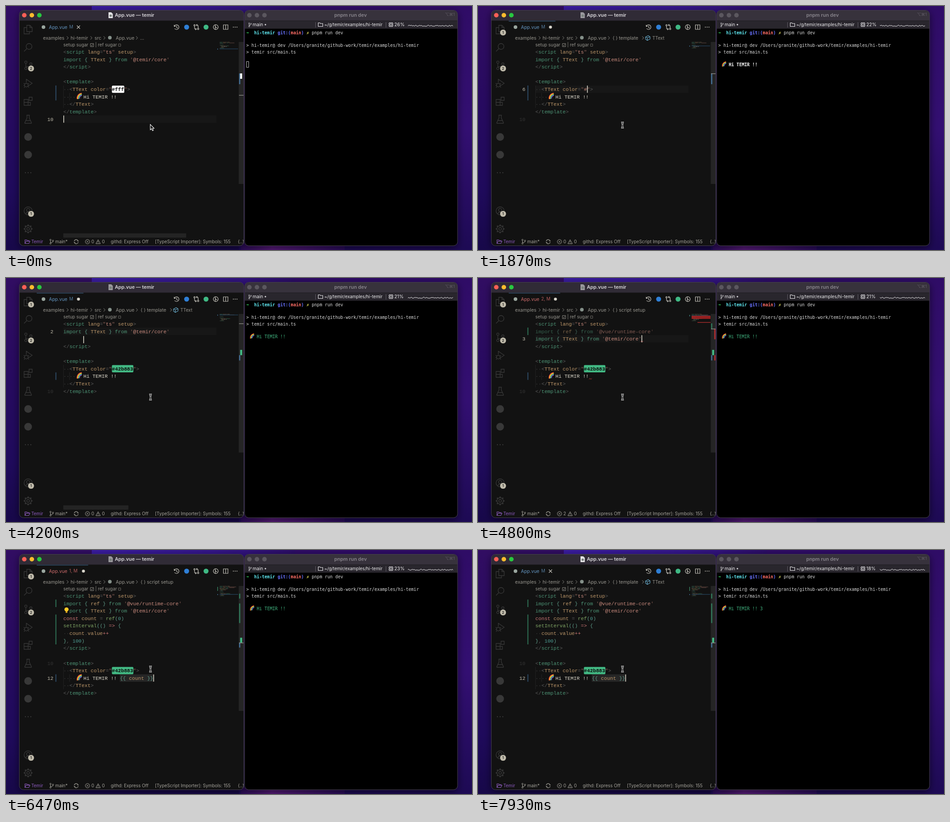
An HTML page with a canvas for the animation above (8 s loop, 1032 px wide and 543 px high).

```html
<!DOCTYPE html>
<html lang="en">
<head>
<meta charset="utf-8">
<title>hi-temir</title>
<style>
html, body { margin: 0; width: 100%; height: 100%; overflow: hidden; background: #1c0a50; }
canvas { display: block; }
</style>
</head>
<body>
<canvas id="stage" width="1032" height="543"></canvas>
<script>
const ctx = document.getElementById('stage').getContext('2d');
const LOOP = 8000, CW = 6.721, TW = 5.8, LEFT = 127, PITCH = 16.63;
const UI = 'Inter, "Open Sans", sans-serif';
const CODE = '"Liberation Mono", monospace';
const TERM = '"DejaVu Sans Mono", monospace';
const INK = {
  d: '#5c5c5c', g: '#4d9375', t: '#bd976a', s: '#c98a7d', q: '#8a6158', b: '#5d9a87',
  w: '#dbd7ca', r: '#cb7676', f: '#80a665', n: '#4c9a91'
};

// Each token: colour key, then its text. "c" is a colour swatch, "e" a rainbow.
const IMPORT_REF = "gimport |b{ |tref |b} |gfrom |q'|s@vue/runtime-core|q'";
const IMPORT_TEXT = "gimport |b{ |tTText |b} |gfrom |q'|s@temir/core|q'";
const TIMER = ['rconst |tcount |d= |fref|b(|n0|b)', 'fsetInterval|b(() |r=> |b{',
  'd  |tcount|d.|tvalue|r++', 'b}|d, |n100|b)'];

const ACT = {
  output: 300, point: 560, toColor: 1000, erase: 1500, type: 1980, save1: 2870, green: 3000,
  toImport: 3700, enter: 4150, auto: 4600, errors: 4800, paste: 5400, lint: 5850,
  toText: 6060, mustache: 6370, settle: 6650, save2: 7070, count: 7600
};
const CARET = [
  [-200, 127, 10], [ACT.toColor, 261.4, 6], [1500, 254.7, 6], [1650, 248, 6], [1800, 241.2, 6],
  [1980, 248, 6], [2090, 254.7, 6], [2200, 261.4, 6], [2310, 268.2, 6], [2420, 274.9, 6], [2530, 281.6, 6],
  [ACT.toImport, 362, 2], [ACT.enter, 127, 3], [ACT.auto, 362, 3], [ACT.paste, 127, 4], [5500, 174, 7],
  [ACT.toText, 245.5, 12], [6250, 252, 12], [ACT.mustache, 326.2, 12], [7500, 326.2, 12]
];

const lineY = n => 102 + PITCH * (n - 1);
const during = (t, a, b) => t >= a && t < b;
const rand = n => { const v = Math.sin(n * 91.7 + 4.1) * 43758.5; return v - Math.floor(v); };

function rect(x, y, w, h, c) { ctx.fillStyle = c; ctx.fillRect(x, y, w, h); }
function round(x, y, w, h, r, c) { ctx.fillStyle = c; ctx.beginPath(); ctx.roundRect(x, y, w, h, r); ctx.fill(); }
function dot(x, y, r, c) { ctx.fillStyle = c; ctx.beginPath(); ctx.arc(x, y, r, 0, 7); ctx.fill(); }
function text(s, x, y, c, size, font = UI, style = '') {
  ctx.font = `${style} ${size}px ${font}`;
  ctx.fillStyle = c;
  ctx.fillText(s, x, y + size * 0.35);
}
function draw(path, c, w = 1, x = 0, y = 0) {
  ctx.save();
  ctx.translate(x, y);
  ctx.strokeStyle = c;
  ctx.lineWidth = w;
  ctx.stroke(new Path2D(path));
  ctx.restore();
}
const ring = (x, y, r) => `M${x + r} ${y}a${r} ${r} 0 1 0 ${-2 * r} 0a${r} ${r} 0 1 0 ${2 * r} 0`;
const chevron = (x, y) => draw('M-2 -3.5L1.6 0L-2 3.5', '#8b8b86', 1, x, y);

function rainbow(x, y, s) {
  ctx.save();
  ctx.translate(x, y);
  ctx.scale(s, s);
  ctx.rotate(-0.16);
  ['#e8433f', '#f39a32', '#f5de4b', '#57b75a', '#3f93df', '#8a55b8'].forEach((c, i) => {
    ctx.strokeStyle = c;
    ctx.lineWidth = 1.3;
    ctx.beginPath();
    ctx.arc(13, 12, 11.5 - i * 1.15, Math.PI * 0.99, Math.PI * 1.52);
    ctx.stroke();
  });
  ctx.restore();
}

function squiggle(x, end, y) {
  ctx.strokeStyle = '#c5413c';
  ctx.lineWidth = 1;
  ctx.beginPath();
  ctx.moveTo(x, y);
  for (let i = 1; x + i * 2 <= end; i++) ctx.lineTo(x + i * 2, y + (i % 2 ? -2 : 0));
  ctx.stroke();
}

function colorAt(t) {
  if (t < ACT.erase) return '#fff';
  if (t < ACT.type) return '#' + 'f'.repeat(2 - Math.min(2, Math.floor((t - ACT.erase) / 150)));
  return '#' + '42b883'.slice(0, 1 + Math.floor((t - ACT.type) / 110));
}

function docAt(t) {
  const tail = t >= ACT.mustache ? 'b {{ |tcount |b}}' : 'w';
  return [
    'd<|gscript |tlang|d=|q"|sts|q"|t setup|d>',
    ...(t >= ACT.auto ? [IMPORT_REF] : []),
    IMPORT_TEXT,
    ...(during(t, ACT.enter, ACT.auto) ? ['w'] : []),
    ...(t >= ACT.paste ? TIMER : []),
    'd</|gscript|d>', 'w', 'd<|gtemplate|d>',
    `d  <|tTText color|d=|q"|c${colorAt(t)}|q"|d>`,
    'w    |e|wHi TEMIR !!|' + tail,
    'd  </|tTText|d>', 'd</|gtemplate|d>', 'w'
  ];
}

function caretAt(t) {
  let i = CARET.length - 1;
  while (i && CARET[i][0] > t) i--;
  const [at, x, n] = CARET[i], from = CARET[Math.max(0, i - 1)];
  const p = Math.min(1, (t - at) / 90), e = 1 - (1 - p) ** 2;
  const y0 = lineY(from[2]), y1 = lineY(n);
  const stale = at === ACT.enter && p < 1;
  return {
    x: from[1] + (x - from[1]) * e, y: y0 + (y1 - y0) * e + (stale ? 5 : 0),
    line: stale ? from[2] : n, on: (t - at) % 1000 < 500
  };
}

function codeLine(src, n) {
  let x = LEFT;
  const y = lineY(n);
  for (const tok of src.split('|')) {
    const key = tok[0], s = tok.slice(1);
    if (key === 'e') {
      rainbow(x, y - 6.5, 1);
      x += 17.6;
      continue;
    }
    if (x === LEFT) {
      const pad = s.length - s.trimStart().length;
      for (let i = 0; i < pad; i++) text('·', x + i * CW, y, '#3c3c3c', 11.2, CODE);
    }
    if (key === 'c') {
      const valid = [4, 5, 7].includes(s.length);
      if (valid) round(x, y - 8, s.length * CW + 0.5, 16.2, 2, s);
      text(s, x, y, valid ? '#0a0a0a' : INK.s, 11.2, CODE, valid ? 'bold' : '');
    } else {
      text(s, x, y, INK[key], 11.2, CODE);
    }
    x += s.length * CW;
  }
}

function miniMap(doc, line, t) {
  doc.forEach((src, i) => {
    let x = 473;
    for (const tok of src.split('|')) {
      const s = tok.slice(1) || (tok === 'e' ? '##' : '');
      ctx.globalAlpha = 0.55;
      for (const ch of s) {
        if (ch !== ' ') rect(x, 80 + i * 1.65, 0.8, 1, INK[tok[0]] || '#42b883');
        x += 0.95;
      }
    }
  });
  ctx.globalAlpha = 1;
  const y = 80 + (line - 1) * 1.65;
  rect(473, y, 41, 1.2, '#24445f');
  rect(468, y, 1.3, 2, '#4d84b0');
  if (t >= ACT.auto) rect(468, 82, 1.3, t >= ACT.paste ? 9 : 2, '#3d8c68');
  if (during(t, ACT.errors, ACT.lint)) {
    rect(473, 84, 42, 7, 'rgba(190,35,35,.75)');
    rect(486, 98, 29, 1.5, '#a32a2a');
  }
}

function overview(n, k, line, t) {
  const extra = n - 10, p = 12 - 0.22 * extra, top = 90 - 0.75 * extra;
  const y = i => top + (i - 1) * p;
  rect(515.5, 80, 11, 316 - 7.6 * extra, '#252525');
  const blue = t < ACT.save1 ? k - 1 : k;
  rect(516, y(blue), 3, (k - blue + 1) * p, '#3f6688');
  const c = colorAt(t);
  if ([4, 5, 7].includes(c.length)) rect(518.5, y(k - 1), 4.5, p, c);
  if (t >= ACT.auto) rect(516, y(2), 3, p, '#2f6d53');
  if (t >= ACT.paste) rect(516, y(4), 3, 4 * p, '#2f6d53');
  if (during(t, ACT.errors, ACT.lint)) {
    rect(523, y(3), 3.5, (t >= ACT.paste ? 6 : 2) * p, '#a32b2b');
    rect(523, y(k), 3.5, p, '#a32b2b');
  }
  rect(516, y(line), 10.5, 1.2, '#9a9a94');
}

function bulb(y) {
  rect(127, y - 8, 13, 16, '#121212');
  dot(134, y - 2, 4.6, '#ffca28');
  rect(132, y + 2, 4, 3.5, '#d8a51e');
}

function badge(s, x, y) {
  dot(x, y, 6.6, '#bfbaaa');
  ctx.textAlign = 'center';
  text(s, x, y, '#191919', 8, UI, '600');
  ctx.textAlign = 'left';
}

function activity(dirty) {
  const c = '#383838', icon = (y, d) => draw(d, c, 1.3, 49, y);
  icon(52, 'M-3 -9H4L9 -4V5H-3ZM4 -9V-4H9M-3 -4H-9V10H3V5');
  icon(92, ring(2, -2, 6.5) + 'M-3 3L-9 9');
  icon(132, ring(-5, -7, 2.6) + ring(-5, 7, 2.6) + ring(6, -3, 2.6) + 'M-5 -4V4M6 0C6 4 -3 2 -5 4');
  icon(172, 'M-4 -2V-9L9 0L0 6' + ring(-4, 4, 4) + 'M-10 0L-7 2M-10 5H-8M-9 10L-7 7M2 0L-1 2M2 9L-1 7');
  icon(212, 'M-9 -4H0V9H-9ZM-9 2.5H5V9H0M0 2.5H5M2 -9H9V-2H2Z');
  icon(252, 'M-3.5 -9H3.5M-2.5 -9V-3L-7.5 8Q-8 9 -6.5 9H6.5Q8 9 7.5 8L2.5 -3V-9M-5 3H5');
  dot(49, 291.5, 8.5, c);
  dot(49, 331, 8.5, c);
  [-6, 0, 6].forEach(x => dot(49 + x, 371, 1.2, c));
  icon(456, ring(0, 0, 9) + ring(0, -2, 3.6) + 'M-6 7Q0 -2 6 7');
  icon(496, ring(0, 0, 3) + ring(0, 0, 7));
  for (let i = 0; i < 8; i++) {
    const a = i * Math.PI / 4;
    rect(49 + Math.cos(a) * 8.4 - 1.3, 496 + Math.sin(a) * 8.4 - 1.3, 2.6, 2.6, c);
  }
  if (dirty) badge('1', 55.5, 59);
  badge('2', 55.5, 139);
  badge('1', 55.5, 462.5);
}

function toolbar() {
  const c = '#c6c4bc', at = (x, d) => draw(d, c, 1.2, x, 47);
  at(378, 'M-5 -2A5.2 5.2 0 1 1 -4.5 3M-5.5 -5V-1.5H-2M0 -3V1L2.5 2');
  dot(400, 47, 5.5, '#2f7fd6');
  at(421.5, ring(-4, -4, 1.6) + ring(4, 4, 1.6) + 'M-4 -2V3Q-4 4.5 -2 4.5H0M-2 2.5L0 4.5L-2 6.5M4 2V-3Q4 -4.5 2 -4.5H0M2 -6.5L0 -4.5L2 -2.5');
  dot(443, 47, 5.5, '#3fb984');
  at(464.5, ring(0, 0, 5.4) + 'M-1 -5V5M-1 -1L3 2');
  at(486.5, 'M-5 -5H5V5H-5ZM0 -5V5');
  [-4, 0, 4].forEach(x => dot(507.5 + x, 47, 1, c));
}

function crumbs(t) {
  const c = '#96948d', say = (s, x) => text(s, x, 71, c, 10.5);
  say('examples', 82); chevron(136.5, 71);
  say('hi-temir', 143); chevron(189, 71);
  say('src', 196); chevron(218, 71);
  dot(230, 70.5, 4, '#85918a');
  say('App.vue', 243); chevron(290, 71);
  if (t < 1080) return say('...', 297);
  text('{ }', 298, 71, c, 10);
  if (during(t, 4400, ACT.settle)) return say('script setup', 312);
  say('template', 312);
  chevron(365.5, 71);
  draw('M-5 -2L1 -5L5 -2.5V2.5L-1 5.5L-5 3ZM-5 -2L-1 0L5 -2.5M-1 0V5', '#66a9c9', 1.1, 376, 71);
  text('TText', 386, 71, c, 10);
}

function tab(t, dirty) {
  const errs = during(t, ACT.errors, 6000) ? 2 : during(t, 6000, ACT.settle) ? 1 : 0;
  const end = errs ? 182 : 171.5;
  if (dirty) rect(68, 33, end - 68, 1.2, '#36597a');
  dot(83, 47, 4, '#9aa69f');
  const c = errs ? '#cb6a6a' : '#6394bf';
  text('App.vue', 95, 47, c, 10.4);
  text(errs ? `${errs}, M` : 'M', 140, 47, errs ? '#b45c5c' : '#53799a', 9.8);
  if (dirty) dot(errs ? 171.5 : 160.5, 47, 3.3, '#d7d4ca');
  else draw('M-3.5 -3.5L3.5 3.5M3.5 -3.5L-3.5 3.5', '#c6c4bc', 1.2, 160.5, 47);
}

function statusBar(t) {
  const y = 524.5, c = '#a5a39b', say = (s, x) => text(s, x, y, c, 9.9);
  draw('M-5 4V-4H-1L0 -2.5H4V-1M-5 4L-2.5 -1H6L3.5 4Z', '#8d5bbf', 1.1, 47, y);
  text('Temir', 56, y, '#8d5bbf', 9.9);
  draw(ring(-2.5, -4, 1.5) + ring(-2.5, 4, 1.5) + ring(3, -2, 1.5) + 'M-2.5 -2.5V2.5M3 -.5Q3 2 -2.5 2', c, 1, 101, y);
  say('main*', 109);
  draw('M-4.5 -1A4.5 4.5 0 0 1 4 -2M4.5 1A4.5 4.5 0 0 1 -4 2M2 -1.5H5.5M-5.5 1.5H-2', c, 1.1, 155.5, y);
  draw(ring(0, 0, 4.8) + 'M-2 -2L2 2M2 -2L-2 2', c, 1, 180.5, y);
  say(during(t, ACT.errors, 6100) ? '2' : '0', 189);
  draw('M0 -4.5L5 4.5H-5ZM0 -1.5V1.5M0 2.5V3.5', c, 1, 204, y);
  say('0', 212.5);
  say('githd: Express Off', 232);
  say('[TypeScript Importer]: Symbols: 155', 330);
  say('{..}', 513.5);
}

function editor(t) {
  const dirty = during(t, ACT.erase, ACT.save1) || during(t, ACT.enter, ACT.save2);
  const doc = docAt(t), k = doc.findIndex(s => s.includes('|e|')) + 1;
  const caret = caretAt(t), hasTimer = t >= ACT.paste;
  const blame = during(t, 3020, ACT.toImport);
  ctx.save();
  ctx.beginPath();
  ctx.roundRect(30, 10, 496.5, 523, 9);
  ctx.clip();
  rect(30, 10, 497, 524, '#121212');
  rect(30, 10, 497, 22.5, '#302b36');
  ['#ff5f57', '#febc2e', '#28c840'].forEach((c, i) => dot(40.5 + i * 16.7, 20.5, 5, c));
  ctx.fillStyle = dirty ? '#9b999e' : '#e4e3e6';
  ctx.fill(new Path2D('M227 14H233L236.5 17.5V27H227Z'));
  dot(231.8, 21.5, 2.6, '#77807b');
  text('App.vue — temir', 241, 20.5, '#d8d6da', 10.8, UI, '600');

  tab(t, dirty);
  toolbar();
  crumbs(t);
  activity(dirty);

  text('setup sugar', LEFT, 87, '#96948d', 9.9);
  draw('M187 83.5H194V90.5H187ZM188.5 87L190 88.8L192.7 85', '#96948d', 0.9);
  text('| ref sugar', 197.5, 87, '#96948d', 9.9);
  draw('M249 84.5H254V89.5H249Z', '#77756f', 0.9);

  if (!blame && !hasTimer) rect(LEFT, lineY(caret.line) - 8.3, 339, 16.6, '#171717');
  if (hasTimer && t < ACT.toText) {
    [135, 128, 101, 47].forEach((w, i) => rect(LEFT, lineY(4 + i) - 8.3, w, 16.6, '#292929'));
  }
  if (t >= ACT.mustache) rect(252, lineY(k) - 8.3, 74, 16.6, '#262626');

  for (let n = k - 1; n <= k + 1; n++) rect(LEFT, lineY(n) - 8.3, 0.8, 16.7, '#272727');
  rect(LEFT + 2 * CW, lineY(k) - 8.3, 0.8, 16.7, '#2b2b2b');
  doc.forEach((src, i) => {
    ctx.globalAlpha = i === 1 && during(t, ACT.auto, ACT.lint) ? 0.6 : 1;
    codeLine(src, i + 1);
  });
  ctx.globalAlpha = 1;

  ctx.textAlign = 'right';
  if (caret.line !== 10) text('10', 105, lineY(10), '#333', 11.2, CODE);
  text(caret.line, 105, lineY(caret.line), '#bfbaaa', 11.2, CODE);
  ctx.textAlign = 'left';

  const bar = (a, b, c) => rect(109.5, lineY(a) - 8.3, 2, (b - a + 1) * PITCH, c);
  bar(t < ACT.save1 ? k - 1 : k, k, '#2d4a64');
  if (t >= ACT.auto) bar(2, 2, '#2f7355');
  if (hasTimer) bar(4, 7, '#2f7355');

  if (during(t, ACT.errors, ACT.lint)) {
    squiggle(360, 367, lineY(3) + 7);
    squiggle(246, 253, lineY(k) + 7);
    if (hasTimer) [135, 128, 101, 47].forEach((w, i) => squiggle(LEFT, LEFT + w, lineY(4 + i) + 7));
  }
  if (during(t, 5000, 6000)) bulb(lineY(1));
  if (during(t, 6100, ACT.settle)) bulb(lineY(3) - 1);

  if (blame) {
    ctx.save();
    ctx.beginPath();
    ctx.rect(LEFT, 80, 339, 430);
    ctx.clip();
    text('mossyplank [20 hours ago]', 322, lineY(k - 1), '#626262', 11.2, CODE, 'italic');
    ctx.restore();
  }
  miniMap(doc, caret.line, t);
  overview(doc.length, k, caret.line, t);
  if (t < 900) rect(LEFT, 506, 272, 9.5, '#242424');
  if (during(t, 4000, 4800)) rect(LEFT, 506, 144, 9.5, '#242424');
  if (caret.on) rect(caret.x, caret.y - 8, 1.6, 16, '#dbd7ca');
  statusBar(t);
  ctx.restore();
}

function cpuAt(t) {
  const marks = [[0, 26], [900, 24], [1800, 22], [2800, 19], [3900, 21], [4900, 22], [5900, 23], [6900, 20], [7800, 18]];
  return marks.filter(m => m[0] <= t).pop()[1];
}

function terminal(t) {
  ctx.save();
  ctx.beginPath();
  ctx.roundRect(528.5, 10, 471.5, 523, 9);
  ctx.clip();
  rect(528, 10, 473, 524, '#000');
  rect(528, 10, 473, 23, '#37323c');
  rect(528, 33, 473, 17.5, '#29262d');
  rect(528, 32.5, 473, 0.8, '#18161a');
  [539, 555.7, 572.4].forEach(x => dot(x, 20.5, 5, '#5b575f'));
  text('pnpm run dev', 727, 20.5, '#89858d', 10.8, UI, '600');
  text('⌥⌘1', 972, 19, '#625d67', 9, 'Inter, "DejaVu Sans", sans-serif');

  const c = '#eeedef';
  draw(ring(-2, -3, 1) + ring(-2, 4, 1) + ring(2, -2, 1) + 'M-2 -2V3M2 -1Q2 1 -2 2', c, 0.9, 540.5, 41.5);
  text('main', 546, 41.5, c, 10.3);
  dot(574.5, 41.5, 1.7, '#c9c7cb');
  draw('M685.5 36V48M841.5 36V48', '#605c65');
  draw('M-5 4V-4H-1.5L0 -2.5H5V4Z', c, 1.1, 696.5, 41.5);
  text('~/g/temir/examples/hi-temir', 705, 41.5, c, 9.7);
  draw('M-4 -4H4V4H-4ZM-2 -2H2V2H-2Z', c, 1, 852.5, 41.5);
  draw('M-2 -5.5V-4M2 -5.5V-4M-2 4V5.5M2 4V5.5M-5.5 -2H-4M-5.5 2H-4M4 -2H5.5M4 2H5.5', '#a9a7ac', 0.8, 852.5, 41.5);
  text(cpuAt(t) + '%', 860, 41.5, c, 10.3);
  const shift = Math.floor(t / 800);
  ctx.strokeStyle = c;
  ctx.lineWidth = 1;
  ctx.beginPath();
  for (let i = 0; i <= 50; i++) ctx.lineTo(890 + i * 2, 45 - 2.6 * rand(i + shift) ** 2);
  ctx.stroke();

  const put = (s, col, row, color, bold) => text(s, 532 + col * TW, 60 + row * 14.05, color, 9.63, TERM, bold ? 'bold' : '');
  put('➜', 0, 0, '#32c95a', true);
  put('hi-temir', 3, 0, '#5ee5ee', true);
  put('git:(', 12, 0, '#6871ff', true);
  put('main', 17, 0, '#ff6e67', true);
  put(')', 21, 0, '#6871ff', true);
  put('✗', 23, 0, '#f4ee65', true);
  put('pnpm run dev', 25, 0, '#d9d9d9');
  put('> hi-temir@ dev /Users/granite/github-work/temir/examples/hi-temir', 0, 2, '#d9d9d9');
  put('> temir src/main.ts', 0, 3, '#d9d9d9');
  if (t < ACT.output) {
    draw('M532.5 123.5H537.5V136.5H532.5Z', '#bdbdbd');
  } else {
    rainbow(538, 125, 0.82);
    const green = t >= ACT.green;
    const tail = t >= ACT.count ? ' ' + Math.floor((t - ACT.count) / 100) : '';
    put('Hi TEMIR !!' + tail, 4, 5, green ? '#42b883' : '#fff', !green);
  }
  ctx.restore();
}

function blend(x0, y0, x1, y1, stops) {
  const g = ctx.createLinearGradient(x0, y0, x1, y1);
  stops.forEach(s => g.addColorStop(...s));
  return g;
}
function backdrop() {
  rect(0, 0, 1032, 543, blend(0, 0, 0, 543, [[0, '#310d62'], [0.4, '#270a60'], [0.75, '#1f0a5c'], [1, '#170849']]));
  rect(516, 0, 516, 543, blend(0, 0, 0, 543, [[0, '#2f0c66'], [0.5, '#330f72'], [1, '#1d0a54']]));
  rect(190, 0, 450, 14, blend(190, 0, 640, 0, [[0, '#3a1ca0'], [0.6, '#34168a'], [1, '#2c0d66']]));
  rect(520, 528, 230, 15, blend(520, 0, 750, 0, [[0, '#2a0c56'], [0.3, '#561a78'], [1, '#2a0c5a']]));
}

function frame(x, w) {
  ctx.save();
  ctx.shadowColor = 'rgba(0,0,0,.6)';
  ctx.shadowBlur = 18;
  ctx.shadowOffsetY = 4;
  round(x, 10, w, 523, 9, '#111');
  ctx.restore();
}
function edge(x, w) {
  ctx.strokeStyle = '#46414d';
  ctx.lineWidth = 1;
  ctx.beginPath();
  ctx.roundRect(x, 9.5, w, 524, 9);
  ctx.stroke();
}

function pointer(t) {
  if (t < ACT.point) {
    const p = new Path2D('M319.5 263.5V275.5L322.3 273L324.3 277.5L326.3 276.6L324.4 272.3H328Z');
    ctx.fillStyle = '#000';
    ctx.fill(p);
    ctx.strokeStyle = '#fff';
    ctx.lineWidth = 1.1;
    ctx.stroke(p);
  } else {
    const beam = 'M-3 -6Q0 -6 0 -3.5Q0 -6 3 -6M0 -3.5V3.5M-3 6Q0 6 0 3.5Q0 6 3 6M-1.5 1.5H1.5';
    draw(beam, '#fff', 3.2, 320, 265);
    draw(beam, '#000', 1.2, 320, 265);
  }
}

function render() {
  const t = performance.now() % LOOP;
  backdrop();
  frame(529, 471);
  frame(30, 496.5);
  terminal(t);
  editor(t);
  edge(528.5, 471.5);
  edge(29.5, 497);
  pointer(t);
  requestAnimationFrame(render);
}
render();
</script>
</body>
</html>
```
